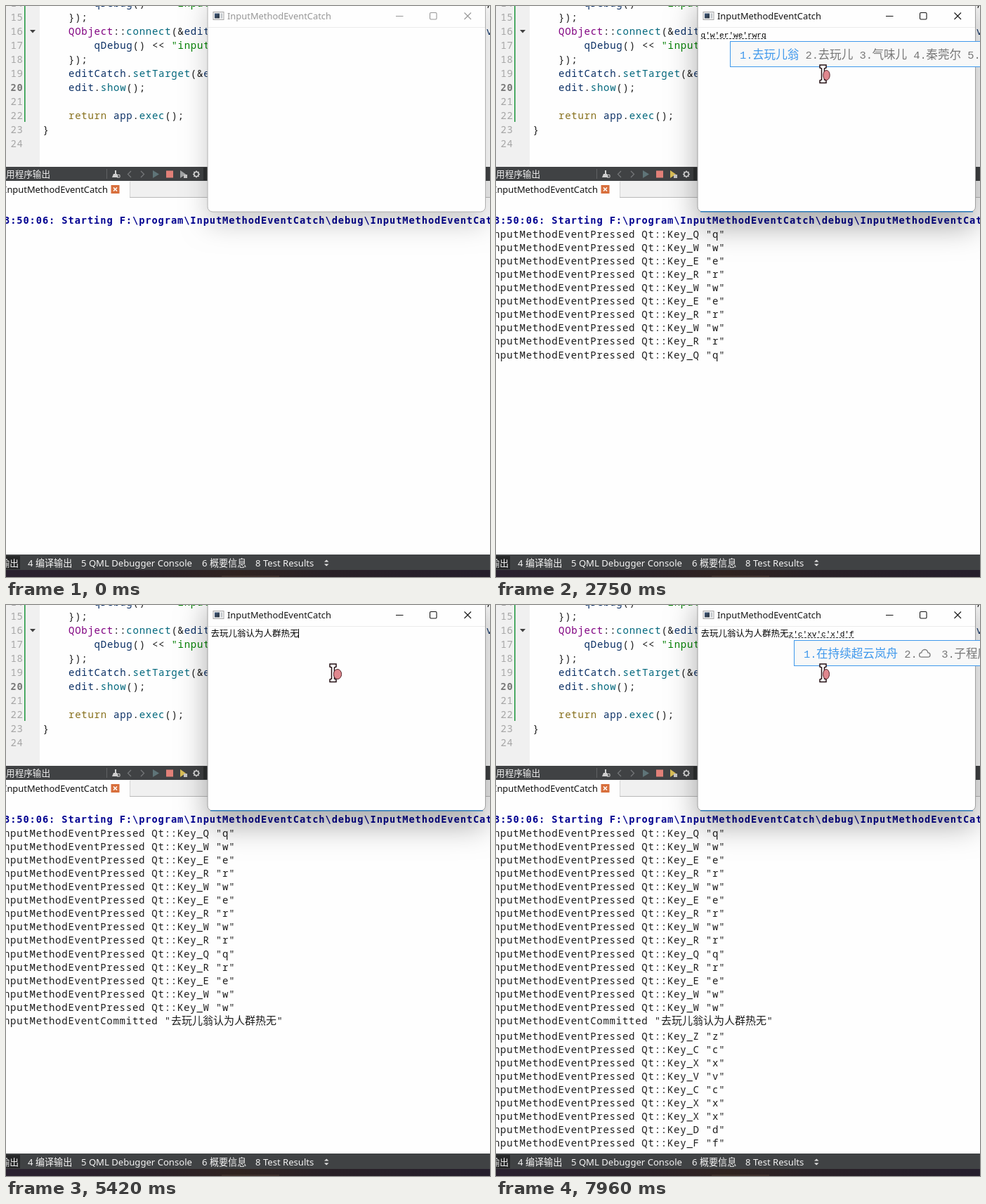
An HTML page with a canvas for the animation above (8000 ms loop, 689 px wide and 813 px high).

```html
<!DOCTYPE html>
<html lang="zh-CN">
<head>
<meta charset="utf-8">
<title>InputMethodEventCatch</title>
<style>
html, body { margin: 0; width: 100%; height: 100%; overflow: hidden; background: #fefefe; }
canvas { display: block; }
</style>
</head>
<body>
<canvas id="stage" width="689" height="813"></canvas>
<script>
const ctx = document.getElementById('stage').getContext('2d');
const LOOP = 8000, ACTIVE_AT = 770, BLINK = 530;
const CJK = '"Noto Sans CJK SC", "Noto Sans CJK"';
const MONO = '14px "Noto Sans Mono", monospace';
const MONO_BOLD = 'bold 13.7px "DejaVu Sans Mono", monospace';
const UI = (size) => `${size}px "Noto Sans", ${CJK}, sans-serif`;
const HAN = (size, weight = 400) => `${weight} ${size}px ${CJK}, sans-serif`;
const COL = 9.15;
const INK = '#1c1c1c', NAVY = '#092e64', TEAL = '#00677c', PURPLE = '#800080';
const OLIVE = '#87701c', GREEN = '#008000', BLUE = '#3f98ec';

const clamp = (v) => Math.max(0, Math.min(1, v));

function text(s, x, y, font, color, align = 'left') {
  ctx.font = font;
  ctx.fillStyle = color;
  ctx.textAlign = align;
  ctx.fillText(s, x, y);
}

// Monospaced text on the editor's column grid
function mono(s, x, y, color, bold = false) {
  ctx.font = bold ? MONO_BOLD : MONO;
  const gap = COL - ctx.measureText('0').width;
  ctx.letterSpacing = gap + 'px';
  text(s, x + gap / 2, y, ctx.font, color);
  ctx.letterSpacing = '0px';
}

function rect(x, y, w, h, color) {
  ctx.fillStyle = color;
  ctx.fillRect(x, y, w, h);
}

function poly(points, color) {
  ctx.beginPath();
  points.forEach(([x, y]) => ctx.lineTo(x, y));
  ctx.closePath();
  ctx.fillStyle = color;
  ctx.fill();
}

function line(points, color, width = 1) {
  ctx.beginPath();
  points.forEach(([x, y], i) => i ? ctx.lineTo(x, y) : ctx.moveTo(x, y));
  ctx.strokeStyle = color;
  ctx.lineWidth = width;
  ctx.stroke();
}

// Code lines: [number, indent, colour, text, colour, text, ...]
const CODE = [
  [14, 8, NAVY, 'qDebug', INK, '() << ', GREEN, '"inputMethod'],
  [15, 4, INK, '});'],
  [16, 4, PURPLE, 'QObject', INK, '::', TEAL, 'connect', INK, '(&', NAVY, 'editCatch', INK, ', &',
    PURPLE, 'InputMethodEventCatch', INK, '::', NAVY, 'inputMethodEventCommitted'],
  [17, 8, NAVY, 'qDebug', INK, '() << ', GREEN, '"inputMethod'],
  [18, 4, INK, '});'],
  [19, 4, NAVY, 'editCatch', INK, '.', TEAL, 'setTarget', INK, '(&', NAVY, 'edit', INK, ');'],
  [20, 4, NAVY, 'edit', INK, '.', TEAL, 'show', INK, '();'],
  [21, 0],
  [22, 4, OLIVE, 'return', INK, ' ', NAVY, 'app', INK, '.', TEAL, 'exec', INK, '();'],
  [23, 0, INK, '}'],
  [24, 0]
];

// Logged keys and the moment each line appears
const KEYS_A = 'QWERWERWRQREWW';
const TIMES_A = [1280, 1380, 1470, 1570, 1690, 1800, 1910, 2060, 2220, 2500, 2860, 2970, 3090, 4160];
const KEYS_B = 'ZCXVCXXDF';
const TIMES_B = [6570, 6660, 6750, 6840, 6940, 7030, 7500, 7650, 7810];
const COMMIT_AT = 4600;
const COMMITTED = '去玩儿翁认为人群热无';

// Input method states: [time, preedit, candidates]
const FIRST = '去玩儿翁|去玩儿|气味儿|秦莞尔|去玩|请问';
const SECOND = '认为人群热无|☁|认为人|热污染|认为';
const STATES = [
  [0, '', ''],
  [1260, 'q', '去|前|请|其|且|起|全|却'],
  [1360, "q'w", '请问|☁|前往|期望|欠我|权威'],
  [1450, "q'we", '请问|☁|气味|权威|前卫|去问'],
  [1550, "q'w'er", '去玩儿|☁|气味儿|秦莞尔|请问'],
  [1670, "q'w'er'w", '去玩儿我|去玩儿|气味儿|秦莞尔|去玩'],
  [1780, "q'w'er'we", FIRST],
  [1890, "q'w'er'we'r", FIRST],
  [2040, "q'w'er'we'rw", FIRST],
  [2200, "q'w'er'we'rwr", FIRST],
  [2480, "q'w'er'we'rwrq", FIRST],
  [2840, "q'w'er'we'rwrqr", FIRST],
  [2950, "q'w'er'we'rwrqre", FIRST],
  [3070, "q'w'er'we'rwrqrew", FIRST],
  [4140, "去玩儿翁r'w'r'q're'w", SECOND],
  [COMMIT_AT, '', ''],
  [6540, 'z', '在|这|中|自|做|着'],
  [6630, "z'c", '支持|☁|组成|政策|注册'],
  [6720, "z'c'x", '子程序|☁|主程序|再持续|支持'],
  [6810, "z'c'xv", '子程序|☁|主程序|再持续'],
  [6910, "z'c'xv'c", '子程序中|☁|子程序|主程序'],
  [6970, "z'c'xv'c'x", '子程序程序|☁|岚禾许昌县|子程序'],
  [7630, "z'c'xv'c'x'd", '子程序程序的|☁|子程序|主程序'],
  [7790, "z'c'xv'c'x'd'f", '在持续超云岚舟|☁|子程序|主程序']
];

function drawCode() {
  rect(0, 0, 689, 229, '#fefefe');
  rect(0, 0, 48, 229, '#f0f0f0');
  rect(26, 0, 1.6, 165, '#279a45');
  poly([[34, 34], [42, 34], [38, 38.5]], '#404040');
  for (const [num, indent, ...parts] of CODE) {
    const y = 21.2 + 20 * (num - 15);
    const current = num === 20;
    mono(String(num), 6, y, current ? '#777' : '#a6a6a6', current);
    let x = 52 + indent * COL;
    for (let i = 0; i < parts.length; i += 2) {
      mono(parts[i + 1], x, y, parts[i]);
      x += parts[i + 1].length * COL;
    }
  }
  mono(',', 682, 1.2, INK);
}

function drawToolbar(active) {
  rect(0, 229, 689, 20, '#404244');
  text('应用程序输出', 63, 244, UI(12.6), '#f2f2f2', 'right');
  rect(143, 232, 1, 14, '#606264');
  rect(155, 234, 2, 5, '#d0d0d0');
  poly([[153, 239], [158, 239], [160, 244], [151, 244]], '#d0d0d0');
  line([[157, 240.5], [162, 240.5], [162, 244], [158, 244]], '#d0d0d0');
  line([[178, 235], [173.5, 239.5], [178, 244]], '#77797b', 1.2);
  line([[192, 235], [196.5, 239.5], [192, 244]], '#77797b', 1.2);
  poly([[209, 234], [218, 239.5], [209, 245]], '#5f7478');
  rect(228, 234.5, 10, 10, '#e28078');
  poly([[248, 234], [256, 239.5], [248, 245]], active ? '#d9bd55' : '#a2a4a5');
  rect(253, 240, 5, 5, '#c4c4c4');
  ctx.beginPath();
  ctx.arc(271, 239.5, 3.2, 0, 7);
  ctx.strokeStyle = '#dcdcdc';
  ctx.lineWidth = 1.5;
  ctx.stroke();
  for (let i = 0; i < 8; i++) {
    const c = Math.cos(i * Math.PI / 4), s = Math.sin(i * Math.PI / 4);
    line([[271 + 3.5 * c, 239.5 + 3.5 * s], [271 + 5 * c, 239.5 + 5 * s]], '#dcdcdc', 1.5);
  }
  rect(281, 230, 300, 18, '#2d2f30');

  rect(0, 249, 689, 24, '#f0f0f0');
  rect(0, 249, 176, 24, '#fefefe');
  rect(176, 250, 1, 22, '#d4d4d4');
  rect(176, 272, 513, 1, '#b8b8b8');
  text('InputMethodEventCatch', 145, 266, UI(12.9), '#111', 'right');
  rect(149.5, 255, 12, 12, '#d86f3c');
  line([[153, 258.5], [158, 263.5]], '#fff', 1.6);
  line([[158, 258.5], [153, 263.5]], '#fff', 1.6);
}

function logKeys(keys, times, t, top) {
  times.forEach((at, i) => {
    if (t < at) return;
    const k = keys[i];
    mono(`inputMethodEventPressed Qt::Key_${k} "${k.toLowerCase()}"`, -12.6, top + 19.1 * i, INK);
  });
}

function drawOutput(t) {
  rect(0, 273, 689, 508, '#fefefe');
  mono('23:50:06: Starting F:\\program\\InputMethodEventCatch\\debug\\InputMethodEventCatch.exe...',
    -12.6, 310.3, '#000090', true);
  logKeys(KEYS_A, TIMES_A, t, 329.6);
  if (t >= COMMIT_AT) {
    mono('inputMethodEventCommitted "', -12.6, 597, INK);
    text(COMMITTED, 235, 597, HAN(15, 300), INK);
    mono('"', 385, 597, INK);
  }
  logKeys(KEYS_B, TIMES_B, t, 618.6);
}

function drawBottomBar() {
  rect(0, 781, 689, 22, '#404244');
  rect(0, 783, 20, 19, '#262728');
  const tabs = [['4 编译输出', 31], ['5 QML Debugger Console', 107], ['6 概要信息', 279], ['8 Test Results', 355]];
  text('3 应用程序输出', 18, 797.5, UI(12.8), '#f4f4f4', 'right');
  tabs.forEach(([s, x]) => text(s, x, 797.5, UI(13.1), '#f4f4f4'));
  poly([[453, 791.5], [459.5, 791.5], [456.2, 788.5]], '#e4e4e4');
  poly([[453, 794.5], [459.5, 794.5], [456.2, 797.5]], '#e4e4e4');
  const g = ctx.createLinearGradient(0, 0, 689, 0);
  [[0, '#2a2130'], [0.3, '#2a2027'], [0.48, '#302320'], [0.65, '#292026'], [1, '#251e2c']]
    .forEach(([p, c]) => g.addColorStop(p, c));
  rect(0, 803, 689, 10, g);
  rect(307, 811, 82, 2, '#3d2f2b');
}

function drawWindow(active) {
  ctx.save();
  ctx.shadowColor = active ? 'rgba(0,0,0,.33)' : 'rgba(0,0,0,.2)';
  ctx.shadowBlur = active ? 42 : 36;
  ctx.shadowOffsetY = active ? 21 : 17;
  ctx.beginPath();
  ctx.roundRect(287, -20, 395.5, 313, 7);
  ctx.fillStyle = '#fefefe';
  ctx.fill();
  ctx.restore();
  ctx.strokeStyle = active ? '#a0a0a0' : '#b0b0b0';
  ctx.lineWidth = 1;
  ctx.stroke();
  rect(288, 30, 394, 1, '#ececec');
  if (active) rect(291, 292, 388, 1.5, '#2f7fbd');

  rect(294.5, 8, 16, 12, '#a8a8a8');
  rect(295.5, 9, 14, 10, '#f2f2f2');
  const g = ctx.createLinearGradient(297, 10, 304, 18);
  g.addColorStop(0, '#3d5a80');
  g.addColorStop(1, '#2b3138');
  rect(297, 10.5, 7, 7, g);
  rect(305.5, 10.5, 2.5, 7, '#c2c7cc');

  const c = active ? '#151515' : '#979797';
  text('InputMethodEventCatch', 315, 19, UI(12.9), c);
  line([[555, 14.5], [565.5, 14.5]], c);
  ctx.beginPath();
  ctx.roundRect(603.5, 9.5, 9.5, 9.5, 1.5);
  ctx.lineWidth = 1.1;
  ctx.stroke();
  line([[652.5, 9.5], [662, 19]], c, 1.1);
  line([[662, 9.5], [652.5, 19]], c, 1.1);
}

function drawCloud(x, y) {
  ctx.beginPath();
  ctx.arc(x + 4, y + 2, 3.2, Math.PI / 2, Math.PI * 1.5);
  ctx.arc(x + 8.5, y - 1, 4.5, Math.PI * 1.1, Math.PI * 1.85);
  ctx.arc(x + 13, y + 2, 3.2, -Math.PI / 2, Math.PI / 2);
  ctx.closePath();
  ctx.strokeStyle = '#777';
  ctx.lineWidth = 1.3;
  ctx.stroke();
}

function drawCandidates(list, left) {
  rect(left, 50, 700, 37, '#f8f8f8');
  ctx.strokeStyle = BLUE;
  ctx.lineWidth = 1;
  ctx.strokeRect(left + 0.5, 50.5, 700, 36);
  let x = left + 14;
  list.split('|').forEach((word, i) => {
    const color = i ? '#777' : BLUE;
    text(i + 1 + '.', x, 74.5, '15.5px "Liberation Mono", monospace', color);
    if (word === '☁') {
      drawCloud(x + 20.5, 69);
      x += 53;
    } else {
      text(word, x + 18, 74.5, HAN(16.6, 300), color);
      x += 27.1 + 16.6 * word.length;
    }
  });
}

function drawEdit(t) {
  const [, preedit, list] = STATES.findLast(([at]) => t >= at);
  const done = t >= COMMIT_AT;
  let x = 291.5;
  if (done) {
    text(COMMITTED, x, 45, HAN(12.5), '#000');
    x += 12.5 * COMMITTED.length;
  }
  const start = x;
  for (const ch of preedit) {
    const han = ch > '~';
    text(ch, x, 45, han ? HAN(12.5) : '11.1px "Liberation Mono", monospace', '#000');
    x += han ? 12.5 : 6.65;
  }
  if (preedit) {
    ctx.setLineDash([3, 1.5]);
    line([[start, 46.5], [x, 46.5]], '#222');
    ctx.setLineDash([]);
  }
  if (t >= ACTIVE_AT && (t - ACTIVE_AT) % (2 * BLINK) < BLINK) rect(Math.round(x - 0.5), 34, 1, 13, '#000');
  if (list) drawCandidates(list, done ? 424 : 333);
}

function drawCursor(t) {
  const p = clamp((t - 30) / 640);
  const e = p * p * (3 - 2 * p);
  const x = 405 + 60 * e, y = 835 - 738 * e;
  const sway = Math.cos((t - 840) / 572.5 * 2 * Math.PI);
  ctx.save();
  ctx.translate(x, y);
  poly([[-4, -13], [5, -13], [5, -9], [2.5, -8], [2.5, 8], [5, 9], [5, 12.5], [-4, 12.5], [-4, 9],
    [-1.5, 8], [-1.5, -8], [-4, -9]], '#fff');
  ctx.strokeStyle = '#241014';
  ctx.lineWidth = 1.5;
  ctx.stroke();
  ctx.beginPath();
  ctx.ellipse(6 + sway, 1.5, 5 + 0.6 * sway, 7, 0, 0, 7);
  ctx.fillStyle = '#e0878e';
  ctx.fill();
  ctx.strokeStyle = '#54262c';
  ctx.lineWidth = 1;
  ctx.stroke();
  ctx.restore();
}

function draw(t) {
  const active = t >= ACTIVE_AT;
  drawCode();
  drawToolbar(active);
  drawOutput(t);
  drawBottomBar();
  drawWindow(active);
  drawEdit(t);
  drawCursor(t);
}

const begin = performance.now();
function tick() {
  draw((performance.now() - begin) % LOOP);
  requestAnimationFrame(tick);
}
tick();
</script>
</body>
</html>
```
